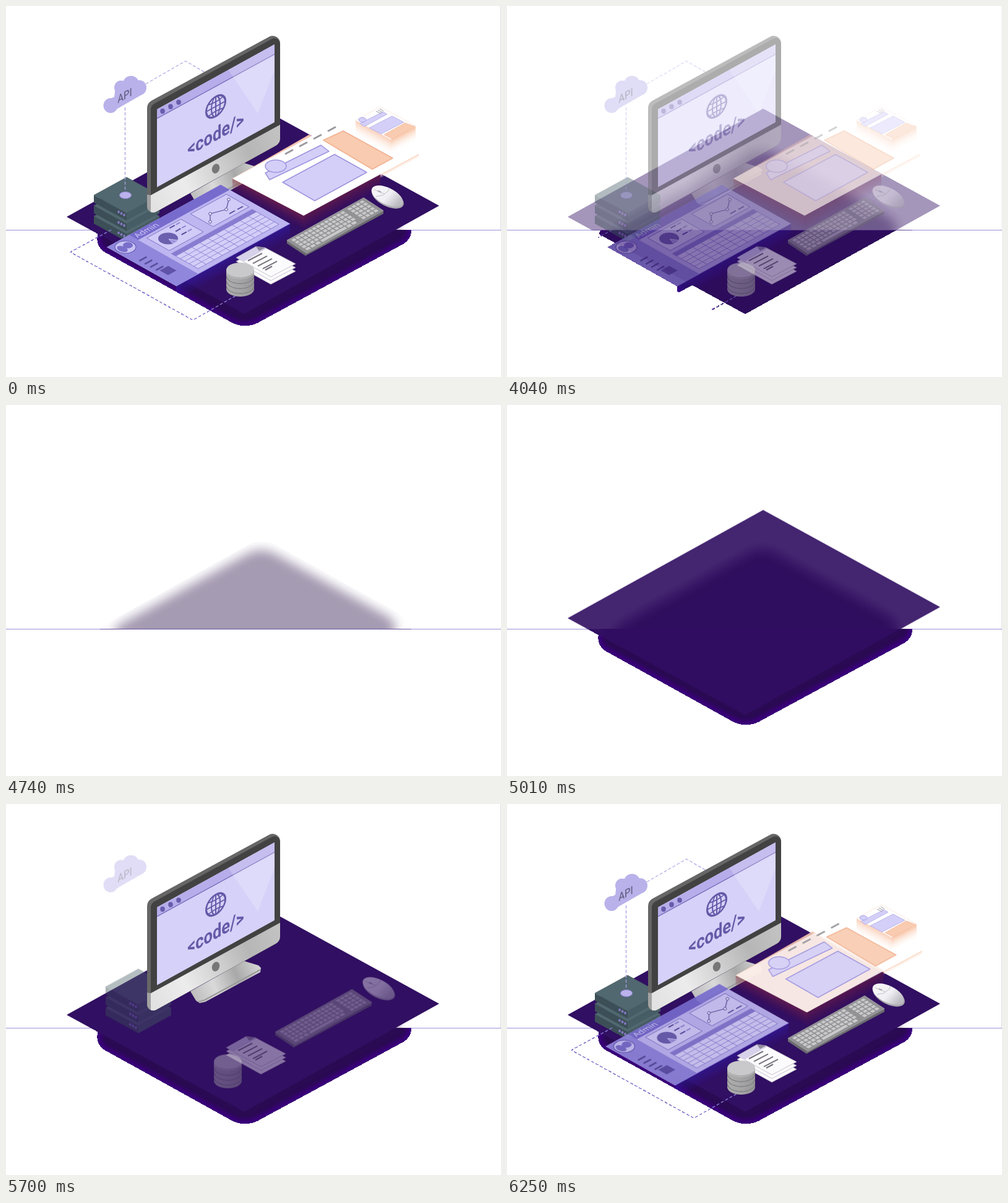
Animation, 800 px wide and 600 px high, one loop 6320 ms. Source, as an HTML page with a canvas:

```html
<!DOCTYPE html>
<html lang="en">
<head>
<meta charset="utf-8">
<title>Isometric workspace</title>
<style>
html, body { margin: 0; width: 100%; height: 100%; overflow: hidden; background: #fff; }
canvas { display: block; width: 800px; height: 600px; }
</style>
</head>
<body>
<canvas id="stage" width="800" height="600"></canvas>
<script>
const W = 800, H = 600, LOOP = 6320, SPLIT = 362, SLOPE = 0.555;
const out = document.getElementById('stage').getContext('2d');
let g;

function surface(opts) {
  const c = document.createElement('canvas');
  c.width = W;
  c.height = H;
  return c.getContext('2d', opts);
}
function layer(draw) {
  g = surface();
  g.lineJoin = 'round';
  draw();
  return g.canvas;
}

// Drawing helpers; points are flat lists x, y, x, y ...
function path(p, open) {
  g.beginPath();
  for (let i = 0; i < p.length; i += 2) g.lineTo(p[i], p[i + 1]);
  if (!open) g.closePath();
}
function paint(fill, stroke, width = 1) {
  if (fill) { g.fillStyle = fill; g.fill(); }
  if (stroke) { g.strokeStyle = stroke; g.lineWidth = width; g.stroke(); }
}
function poly(p, fill, stroke, width) { path(p); paint(fill, stroke, width); }
function line(p, stroke, width) { path(p, true); paint(null, stroke, width); }
function oval(x, y, rx, ry, fill, stroke, width, turn = 0) {
  g.beginPath();
  g.ellipse(x, y, rx, ry, turn, 0, 7);
  paint(fill, stroke, width);
}
function rounded(p, radii) {
  const n = p.length;
  g.beginPath();
  g.moveTo((p[0] + p[n - 2]) / 2, (p[1] + p[n - 1]) / 2);
  for (let i = 0; i < n; i += 2)
    g.arcTo(p[i], p[i + 1], p[(i + 2) % n], p[(i + 3) % n], radii[i / 2]);
  g.closePath();
}
function blend(x0, y0, x1, y1, ...cols) {
  const f = g.createLinearGradient(x0, y0, x1, y1);
  cols.forEach((c, i) => f.addColorStop(i / (cols.length - 1), c));
  return f;
}
function side(x0, y0, x1, y1, h, from, to) {
  g.save();
  g.transform(1, (y1 - y0) / (x1 - x0), 0, 1, x0, y0);
  g.fillStyle = blend(0, 0, 0, h, from, to);
  g.fillRect(0, 0, x1 - x0, h);
  g.restore();
}
function label(text, x, y, font, color, m) {
  g.save();
  g.transform(...m, x, y);
  g.font = font;
  g.fillStyle = color;
  g.textAlign = 'center';
  g.textBaseline = 'alphabetic';
  g.fillText(text, 0, 0);
  g.restore();
}
// Maps plane coordinates a, b (0..1) onto a parallelogram.
function plane(ox, oy, ax, ay, bx, by) {
  const at = (a, b) => [ox + a * ax + b * bx, oy + a * ay + b * by];
  return {
    at,
    quad: (a0, a1, b0, b1) => [...at(a0, b0), ...at(a1, b0), ...at(a1, b1), ...at(a0, b1)],
    seg: (a0, b0, a1, b1) => [...at(a0, b0), ...at(a1, b1)]
  };
}

function shadow() {
  const box = [413.5, 214, 682, 363, 386, 523.5, 121, 376.5], radii = [45, 25, 45, 25];
  g.save();
  g.beginPath();
  g.rect(0, 0, W, SPLIT);
  g.clip();
  rounded(box, radii);
  g.clip();
  g.filter = 'blur(9px)';
  rounded(box.map((v, i) => i % 2 ? 368 + (v - 368) * 0.91 : 401 + (v - 401) * 0.91), radii);
  paint('#2a1148');
  g.restore();
  g.save();
  g.beginPath();
  g.rect(0, SPLIT, W, H);
  g.clip();
  rounded(box, radii);
  paint('#2a0a52');
  g.clip();
  g.filter = 'blur(3px)';
  rounded(box, radii);
  paint(null, '#3a007c', 14);
  g.restore();
}

function desk() { poly([414, 166, 700, 323, 385, 498, 98, 341], '#310f62'); }

function monitor() {
  // Foot
  poly([298, 303, 385, 254, 408, 261, 412, 265, 411, 272, 322, 320, 313, 322, 307, 318],
    blend(300, 310, 410, 265, '#bcbcbc', '#d9d9d9', '#a9a9a9', '#d4d4d4'));
  line([311, 320, 321, 317, 411, 268], '#9b9b9b', 2);
  // Body
  rounded([228, 157, 443, 40, 443, 222, 228, 341], [14, 12, 14, 10]);
  paint('#666666');
  g.save();
  g.clip();
  rounded([234, 161, 443, 46, 443, 225, 234, 338], [12, 9, 14, 6]);
  paint('#424242');
  poly([228, 305, 234, 306, 234, 345, 228, 345], '#a2a2a2');
  poly([234, 306, 443, 192, 443, 240, 234, 345],
    blend(234, 310, 443, 210, '#e2e2e2', '#ececec', '#d2d2d2', '#b6b6b6', '#c2c2c2'));
  g.restore();
  oval(339, 263, 6, 8, '#777777', null, 1, 0.35);
  // Screen
  path([244, 167, 434, 62, 434, 188, 244, 293]);
  paint('#d5d1f8');
  g.save();
  g.clip();
  poly([244, 167, 434, 62, 434, 78, 244, 182], '#b6adea');
  line([244, 182, 434, 78], '#7266b8', 1.2);
  poly([355, 97, 434, 52, 434, 104, 407, 174], 'rgba(255,255,255,.2)');
  g.restore();
  for (let i = 0; i < 3; i++) oval(253 + 13 * i, 170 - 7.2 * i, 3.8, 4.2, '#685dac');
  // Globe
  g.save();
  g.transform(1, -SLOPE, 0, 1, 339, 162.5);
  const ink = '#6559a8';
  oval(0, 0, 15.5, 16, null, ink, 3);
  oval(0, 0, 7, 16, null, ink, 2);
  line([0, -16, 0, 16], ink, 2);
  line([-15, 0, 15, 0], ink, 2);
  for (const s of [-1, 1]) {
    g.beginPath();
    g.moveTo(-13, 9.5 * s);
    g.quadraticCurveTo(0, 5.5 * s, 13, 9.5 * s);
    paint(null, ink, 2);
  }
  g.restore();
  label('<code/>', 339, 218, 'bold 31px Roboto, "Liberation Sans", sans-serif', ink, [0.82, -0.455, 0, 1]);
}

function servers() {
  for (let y = 34; y >= 0; y -= 17) {
    poly([142, 306 + y, 195, 335 + y, 195, 347 + y, 142, 318 + y], '#3c4f57');
    poly([195, 335 + y, 248, 306 + y, 248, 318 + y, 195, 347 + y], '#475d65');
    poly([195, 277 + y, 248, 306 + y, 195, 335 + y, 142, 306 + y], '#516870', '#45595f', 0.7);
    for (let i = 0; i < 3; i++) oval(182 + 4.5 * i, 333 + y + 2.5 * i, 1.8, 2.2, '#8579c4');
  }
}

function cloud() {
  const c = '#b9b1ea';
  oval(169, 161, 11.5, 12, c);
  oval(186, 132, 11, 11.5, c);
  oval(202, 127, 13.5, 14, c);
  oval(216, 132, 11, 12, c);
  poly([168, 173, 222, 142, 226, 128, 204, 120, 177, 130, 175, 147, 160, 154], c);
  label('API', 192, 151, '500 18px Roboto, "Liberation Sans", sans-serif', '#69658a', [0.82, -0.455, 0, 1]);
}

function links() {
  const c = '#8277cd';
  g.setLineDash([5, 3]);
  line([192.5, 164, 192.5, 302], '#aaa0e4', 1.3);
  line([226, 126, 290, 89, 321, 107], '#b1a9e6', 1.3);
  line([170, 362, 104, 398, 302, 508, 374, 467], c, 1.5);
  g.setLineDash([]);
  oval(193, 306, 9.5, 5.5, '#bbb2ec', '#8f85d2', 1);
}

function keyboard() {
  const k = plane(454, 379, 124, -69, 32, 21);
  poly([454, 379, 486, 399, 610, 331, 610, 336, 484, 404, 454, 384], '#6b6b70');
  poly(k.quad(0, 1, 0, 1), '#929295', '#a5a5a8', 0.8);
  const key = (a, w, b) => poly(k.quad(a, a + w, b, b + 0.125), '#c9c9cb');
  for (let r = 0; r < 5; r++) {
    const b = 0.08 + r * 0.172;
    if (r < 4) for (let i = 0; i < 13; i++) key(0.035 + i * 0.053, 0.04, b);
    else {
      for (const a of [0.035, 0.1, 0.165, 0.57, 0.635]) key(a, 0.05, b);
      key(0.235, 0.32, b);
    }
    for (let i = 0; i < 4; i++) key(0.765 + i * 0.053, 0.04, b);
  }
}

function mouse() {
  const tip = 0.46;
  oval(617, 310, 28, 14, '#aaa9b0', null, 1, tip);
  oval(616, 307.5, 27.5, 13.5, blend(600, 296, 630, 324, '#f6f5f8', '#f0eff3', '#bdbcc3'), null, 1, tip);
  line([598, 308, 609, 306, 618, 299, 619, 295], '#c3c1ca', 1);
  line([595, 297, 612, 304], '#c3c1ca', 1);
  line([601, 299, 606, 301], '#a9a7b2', 2.4);
}

function papers() {
  for (let y = 12; y >= 0; y -= 6)
    poly([372, 407 + y, 404, 389 + y, 419, 391 + y, 468, 417 + y, 428, 438 + y], '#fbfafc', '#b9b5c2', 0.8);
  poly([372, 407, 404, 389, 421, 392, 385, 413], 'rgba(180,170,218,.5)');
  poly([404, 389, 419, 391, 409, 396], '#8f8b98');
  for (let i = 0; i < 4; i++)
    line([391 + 8 * i, 412 + 4.3 * i, 414 + 8 * i, 400 + 4.3 * i], '#77747e', 2);
  line([419, 427, 430, 421], '#77747e', 2);
}

function database() {
  g.beginPath();
  g.ellipse(378.5, 458, 22.5, 12, 0, 0, Math.PI);
  g.lineTo(356, 427);
  g.lineTo(401, 427);
  g.closePath();
  paint(blend(356, 0, 401, 0, '#adadad', '#a5a5a6', '#979799'));
  for (let i = 0; i < 4; i++) {
    g.beginPath();
    g.ellipse(378.5, 429 + 8 * i, 22, 12, 0, 0, Math.PI);
    paint(null, i ? '#7f7f84' : '#bcbcbe', 1.3);
  }
  oval(378.5, 427, 22.5, 12, '#c9c8cb');
}

function card() {
  side(565, 185, 622, 216, 25, '#f9cfb9', 'rgba(255,244,238,0)');
  side(622, 216, 662, 195, 22, '#f8c4a6', 'rgba(255,238,228,0)');
  poly([565, 185, 605, 163, 662, 194, 622, 216], '#fff', '#fae2d6', 0.8);
  poly([572, 190, 609, 171, 616, 175, 579, 195], '#d3cff8', '#aaa2e2', 0.7);
  poly([587, 197, 624, 178, 643, 188, 606, 207], '#d3cff8', '#aaa2e2', 0.7);
  poly([611, 208, 645, 189, 661, 195, 624, 215], '#f9cbb0', '#f2b798', 0.7);
  oval(576, 184, 6, 3.8, '#d3cff8', '#9c93de', 0.8);
  for (let i = 0; i < 3; i++) line([598 + 3 * i, 170 - 2 * i, 606 + 2 * i, 174 - 2 * i], '#99959f', 1);
}

function panel() {
  const p = plane(163, 390, 184, -101, 112, 63), ink = '#584d9b';
  side(275, 453, 459, 352, 26, 'rgba(50,30,190,.46)', 'rgba(50,30,190,0)');
  poly(p.quad(0, 1, 0, 1), '#bdb6f0');
  poly(p.quad(0, 0.195, 0, 1), '#9087dc');
  poly(p.quad(0.195, 1, 0, 0.13), '#776bcd');
  line(p.seg(0, 1, 1, 1), '#8f86dc', 1);
  label('Admin', 231, 365, '13.5px "Open Sans", "Noto Sans", sans-serif', '#d9d4fa', [0.87, -0.483, 0.87, 0.483]);
  // Sidebar
  oval(193, 390, 17, 10, '#c9c3f5', '#665bb2', 1.2);
  oval(197, 387, 8, 5, '#7a6fca');
  oval(188, 393, 9, 4.5, '#7a6fca', null, 1, 0.3);
  for (let i = 0; i < 4; i++) line(p.seg(0.035, 0.41 + 0.08 * i, 0.1, 0.41 + 0.08 * i), ink, 2.6);
  poly(p.quad(0.05, 0.125, 0.68, 0.8), '#5f53a8');
  // Pie card
  poly(p.quad(0.25, 0.55, 0.165, 0.49), '#d0cbf7', '#7f74c6', 1);
  oval(262, 376, 16, 9.5, '#6a60ae');
  path([263, 377, 279, 379, 270, 384.5]);
  paint('#9d94dc', '#d0cbf7', 1);
  for (let i = 0; i < 3; i++) {
    const b = 0.2 + i * 0.085;
    line(p.seg(0.43, b, 0.475, b), ink, 2);
    line(p.seg(0.485, b, 0.52, b), '#8f86d0', 2);
  }
  // Chart card
  poly(p.quad(0.635, 0.95, 0.165, 0.49), '#d0cbf7', '#7f74c6', 1);
  const dots = [330, 349, 330, 336, 356, 329, 360, 313];
  line(dots, ink, 1.2);
  for (let i = 0; i < 8; i += 2) oval(dots[i], dots[i + 1], 2.3, 2.3, '#eceafd', ink, 1);
  line([361, 336, 370, 331], ink, 2);
  line([374, 329, 383, 324], ink, 2);
  // Table
  poly(p.quad(0.235, 0.945, 0.545, 0.93), '#d3cef8', '#8b81d2', 1);
  poly(p.quad(0.235, 0.945, 0.545, 0.61), '#877cd0');
  for (let i = 1; i < 5; i++) line(p.seg(0.235, 0.61 + i * 0.064, 0.945, 0.61 + i * 0.064), '#8b81d2', 0.9);
  for (let i = 1; i < 10; i++) line(p.seg(0.235 + i * 0.071, 0.61, 0.235 + i * 0.071, 0.93), '#8b81d2', 0.9);
}

const SHEET = [366, 279, 481, 339, 667, 239, 552, 179];
function sheetBase() {
  side(366, 279, 481, 339, 24, 'rgba(150,45,60,.5)', 'rgba(110,20,60,0)');
  side(481, 339, 605, 272, 26, 'rgba(130,35,55,.5)', 'rgba(110,20,60,0)');
  side(605, 272, 667, 239, 7, '#f9cfb8', 'rgba(255,240,232,0)');
  g.save();
  poly([366, 279, 481, 339, 605, 271, 490, 208], '#f3c4b0');
  g.restore();
}
function sheet() { poly(SHEET, '#fff'); }
function sheetItems() {
  const lilac = '#d3cff8', edge = '#9d94de';
  poly([419, 270, 509, 225, 522, 235, 426, 281], lilac, edge, 1.5);
  poly([447, 285, 531, 240, 583, 269, 499, 315], lilac, edge, 1.5);
  oval(436, 259, 17, 10, lilac, edge, 1.5);
  poly([513, 217, 545, 202, 625, 246, 592, 264], '#f9cbb0', '#f1b190', 1.5);
  for (let i = 0; i < 4; i++) line([451 + 23 * i, 239.5 - 12.3 * i, 464 + 23 * i, 232.5 - 12.3 * i], '#9a989e', 2.8);
}
function border() {
  g.fillStyle = '#dedce8';
  g.fillRect(799, 0, 1, SPLIT);
}

// Timing
const ease = (t, start, length, power = 3) =>
  1 - Math.pow(1 - Math.min(1, Math.max(0, (t - start) / length)), power);
const deskIn = t => ease(t, 4780, 420);
const itemIn = t => ease(t, 5640, 340);
const linkIn = t => ease(t, 5840, 200, 1);
const boardIn = t => ease(t, 6000, 320, 1.6);

// Each part: picture, progress, start offset, opacity from progress
const same = p => p;
const parts = [
  [shadow, t => ease(t, 4620, 285, 1), 0, 0],
  [border, deskIn, 0, 0],
  [desk, deskIn, 0, 40],
  [servers, itemIn, 33, -18],
  [links, linkIn, 0, 0],
  [cloud, itemIn, 0, -53],
  [monitor, t => ease(t, 5340, 330), 0, 20],
  [sheetBase, boardIn, 40, -22],
  [sheet, boardIn, 40, -22, p => p ** 4],
  [sheetItems, boardIn, 40, -22],
  [card, linkIn, 0, 0],
  [panel, boardIn, -40, 22],
  [keyboard, itemIn, -33, -18],
  [mouse, itemIn, -25, -18],
  [papers, itemIn, -28, -23],
  [database, itemIn, -35, -18]
].map(([draw, progress, dx, dy, opacity = same]) => ({ pic: layer(draw), progress, dx, dy, opacity }));

const scene = surface({ willReadFrequently: true });

function render(t) {
  const leaving = t < 4660;
  const fade = t < 3720 ? 1 : Math.max(0, 1 - (Math.floor((t - 3720) / 40) + 1) / 16);
  scene.clearRect(0, 0, W, H);
  for (const part of parts) {
    const p = leaving ? 1 : part.progress(t);
    const alpha = leaving ? fade : part.opacity(p);
    if (alpha <= 0) continue;
    scene.globalAlpha = alpha;
    scene.drawImage(part.pic, part.dx * (1 - p), part.dy * (1 - p));
  }
  out.fillStyle = '#fff';
  out.fillRect(0, 0, W, H);
  out.fillStyle = '#9c90da';
  out.fillRect(0, SPLIT, W, 1);
  out.drawImage(scene.canvas, 0, 0, W, SPLIT + 1, 0, 0, W, SPLIT + 1);
  // Below the line opacity is all or nothing.
  const low = scene.getImageData(0, SPLIT + 1, W, H - SPLIT - 1), d = low.data;
  for (let i = 0; i < d.length; i += 4) {
    if (d[i + 3] < 128) d[i] = d[i + 1] = d[i + 2] = 255;
    d[i + 3] = 255;
  }
  out.putImageData(low, 0, SPLIT + 1);
}

function snap(t) {
  if (t < 3720) return 0;
  if (t < 4320) return 3720 + Math.floor((t - 3720) / 40) * 40;
  if (t < 4660) return 4320;
  if (t < 5010) return 4660 + Math.floor((t - 4660) / 40) * 40;
  return 5010 + Math.floor((t - 5010) / 68.8) * 68.8;
}

let shown = -1;
const begin = performance.now();
function tick() {
  const t = snap((performance.now() - begin) % LOOP);
  if (t !== shown) render(shown = t);
  requestAnimationFrame(tick);
}
tick();
</script>
</body>
</html>
```
